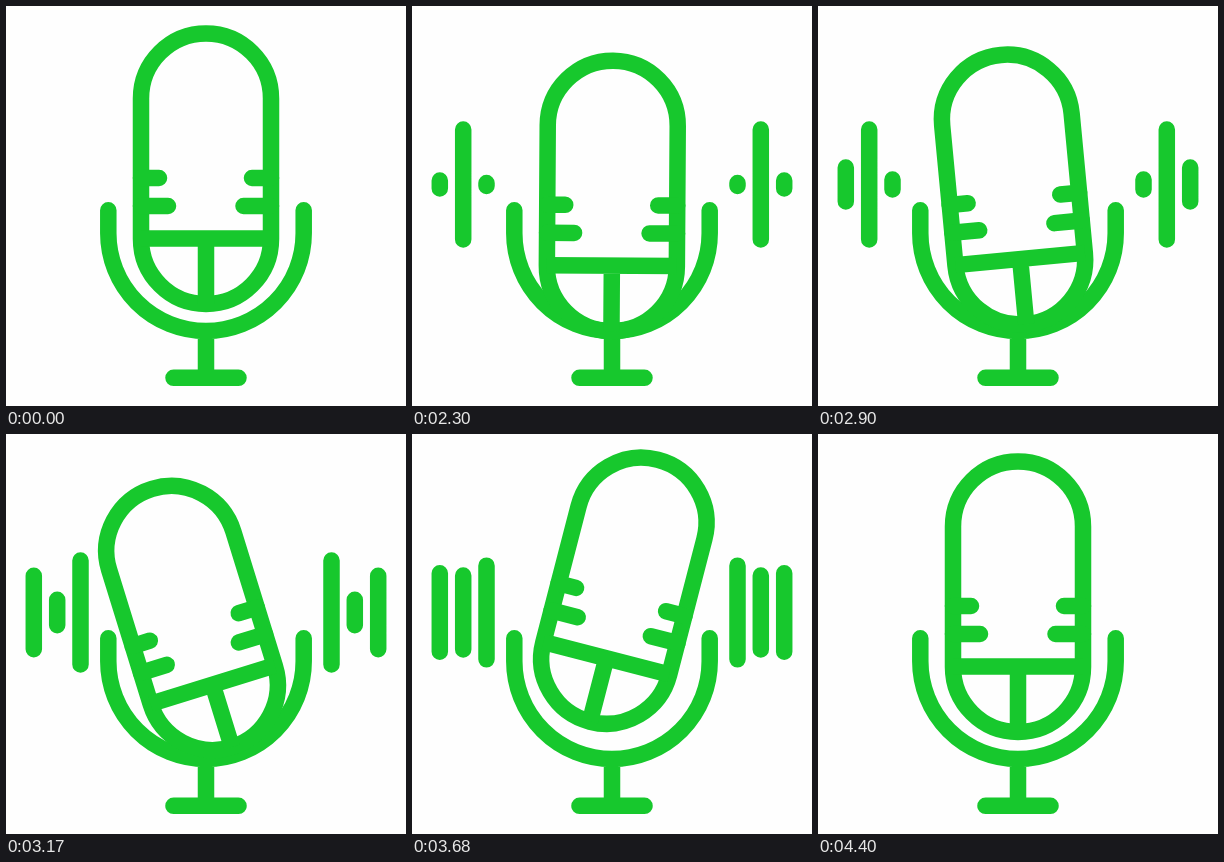
Animation, 400 px wide and 400 px high, one loop 4430 ms. Source, as an HTML page:

```html
<!DOCTYPE html>
<html lang="en">
<head>
<meta charset="utf-8">
<title>Microphone</title>
<style>
  html, body { margin: 0; width: 100%; height: 100%; overflow: hidden; background: #fefefe; }
  svg { display: block; width: 100%; height: 100%; }
</style>
</head>
<body>
<svg viewBox="0 0 400 400" fill="none" stroke="#17c82d" stroke-width="16.5" stroke-linecap="round">
  <path d="M102.3 204.3V227.3a97.7 97.7 0 0 0 195.4 0V204.3M200 325V371.8M167.5 371.8H232.5"/>
  <g id="mic">
    <rect x="135" y="27.5" width="130" height="270.5" rx="65"/>
    <path d="M135 172H153M135 200H162M265 172H246M265 200H237.5"/>
    <path stroke-linecap="butt" d="M135 232.5H265M200 232.5V298"/>
  </g>
  <path id="bars"/>
</svg>
<script>
const LOOP = 4430, START = 2030, STEP = 30, LAST = 80;
const BAR_Y = 178.5, PIVOT = "200 210";
const { PI, sin, cos, abs, min, floor } = Math;

// Turning points of the vertical bounce: [step, offset].
const BOUNCE = [[0, 0], [9, 27.5], [25, -9], [32, 27.5], [54, -9], [65, 9.4], [78, 0]];

// Each bar pulses with its own beat; rise is how many steps it takes to reach full size.
const BARS = [
  { x: 27.8, size: 80, beat: 18.3, phase: 0.5, rise: 15 },
  { x: 51.2, size: 110, beat: 20.25, phase: 0, rise: 1 },
  { x: 74.5, size: 104, beat: 19.6, phase: 0.5, rise: 12 }
];

const ease = u => (1 - cos(PI * u)) / 2;

function drop(n) {
  const i = BOUNCE.findIndex(([step]) => step > n);
  if (i < 0) return 0;
  const [n0, v0] = BOUNCE[i - 1], [n1, v1] = BOUNCE[i];
  return v0 + (v1 - v0) * ease((n - n0) / (n1 - n0));
}

// A swing that grows from rest and settles again.
const tilt = n => 18 * sin(PI * n / LAST) * sin((9.8 * n - 95) * PI / 180);

const barLength = (b, n) =>
  b.size * min(1, n / b.rise) * abs(sin(PI * (n / b.beat + b.phase)));

function barLines(n) {
  if (n === 0 || n === LAST) return "";
  return BARS.map(b => {
    const len = barLength(b, n);
    return [b.x, 400 - b.x].map(x => `M${x} ${BAR_Y - len / 2}v${len}`).join("");
  }).join("");
}

const mic = document.getElementById("mic");
const bars = document.getElementById("bars");

function draw(time) {
  const t = time % LOOP;
  const n = t < START ? 0 : min(LAST, floor((t - START) / STEP) + 1);
  mic.setAttribute("transform", `translate(0 ${drop(n)}) rotate(${tilt(n)} ${PIVOT})`);
  bars.setAttribute("d", barLines(n));
}

const begin = performance.now();
function tick() {
  draw(performance.now() - begin);
  requestAnimationFrame(tick);
}
tick();
</script>
</body>
</html>
```
